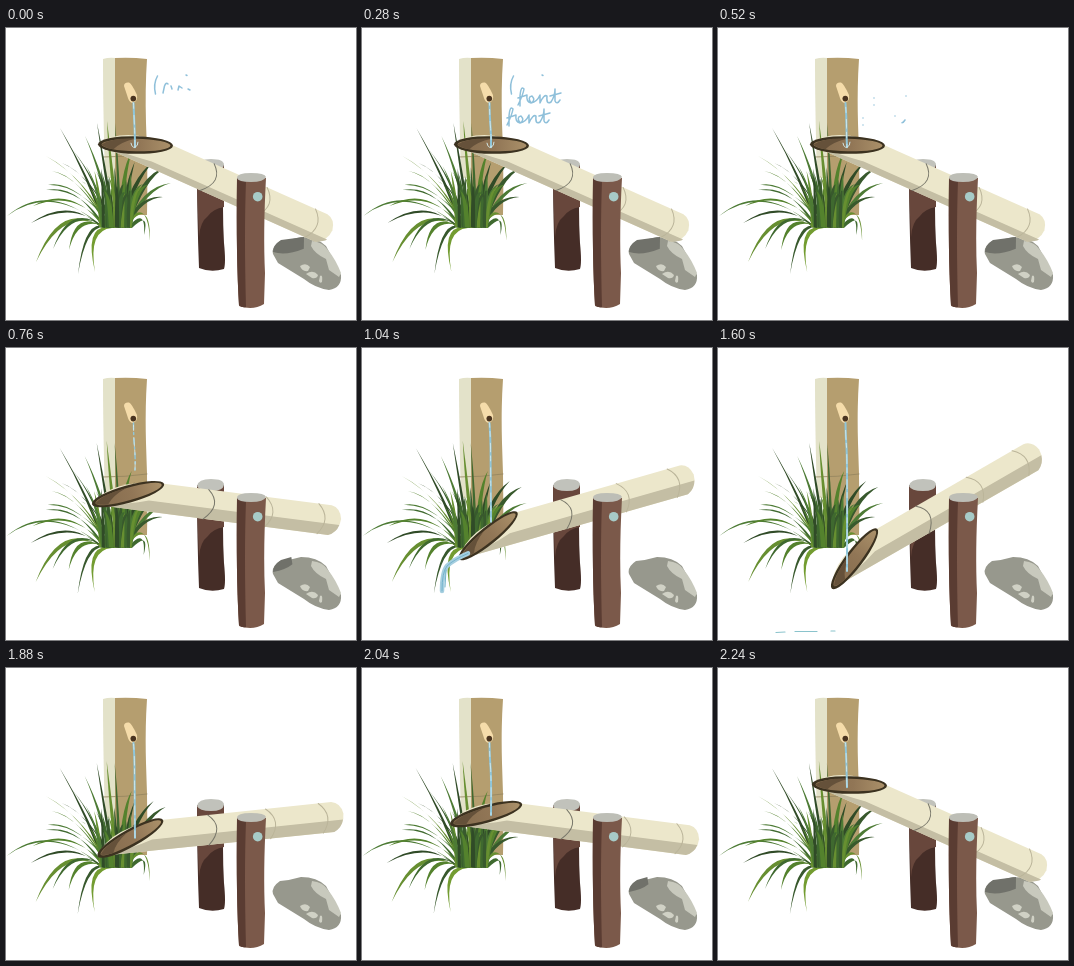
Write an HTML page that moves like this. It is 350 px wide and 292 px high and loops after 2280 ms.

```html
<!DOCTYPE html>
<html lang="en">
<head>
<meta charset="utf-8">
<title>Bamboo water fountain</title>
<style>
  html, body { margin: 0; width: 100%; height: 100%; overflow: hidden; background: #fff; }
  svg { display: block; width: 100vw; height: 100vh; }
  .line { fill: none; stroke-linecap: round; stroke-linejoin: round; }
</style>
</head>
<body>
<svg viewBox="0 0 350 292">
  <defs>
    <linearGradient id="hollow">
      <stop offset="0" stop-color="#846b4d"/>
      <stop offset=".55" stop-color="#917656"/>
      <stop offset="1" stop-color="#aa9069"/>
    </linearGradient>
  </defs>

  <g id="bamboo">
    <path fill="#e3e2c9" d="M97 31Q103 29 110 30V150H99Q97 80 97 31Z"/>
    <path fill="#b59e6f" d="M109 30Q125 29 141 31Q139 60 140 95Q142 140 141 187H109Z"/>
    <path class="line" stroke="#94855f" stroke-width=".8" d="M97 129Q120 129 141 126"/>
  </g>
  <g id="spout">
    <path fill="#f5dcaa" d="M118 58Q118 54 123 54.5Q126 56 131 67Q132 73 127 75Q123 75 121 67Z"/>
    <ellipse cx="127.3" cy="70.6" rx="2.8" ry="2.9" fill="#4a3420"/>
  </g>
  <g id="grass"></g>

  <g id="rock">
    <path fill="#97988d" d="M267 226Q265 219 274 213Q285 212 295 209Q311 209 320 218Q327 231 335 247Q336 260 323 262Q309 260 298 251L272 235Z"/>
    <path fill="#c8c9bd" d="M306 213Q317 214 322 222Q330 232 335 245L333 249L323 242L320 231Q309 226 305 218Z"/>
    <path fill="#d0d1c5" d="M294 238Q300 234 304 239L302 243Q296 244 294 238ZM300 246Q307 241 312 247Q311 251 306 250ZM314 248Q317 246 316 254Q314 256 313 253Z"/>
    <path id="shade" fill="#70716a"/>
  </g>

  <g id="backPost">
    <path fill="#452d27" d="M191 137H218Q216 180 218 215Q220 235 218 241Q205 245 193 240Q191 190 191 137Z"/>
    <path fill="#68473c" d="M191 138H218V179Q207 181 202 188Q194 194 193 209Q191 170 191 138Z"/>
    <path fill="#c1c2bb" d="M191 138Q192 131 205 131Q218 131 218 137Q217 143 205 143Q193 143 191 138Z"/>
  </g>

  <g id="tube">
    <path fill="#ece7cb" d="M-138 17Q-123 -11 -69 -12.5L100 -12.5Q109 -11 111 0Q111 12 100 17.5Z"/>
    <path id="under" fill="#c4bea4"/>
    <path class="line" stroke="#78776a" stroke-width="1" d="M-24 -12.5Q-8 1 -26 17.5"/>
    <path class="line" stroke="#bbb59a" stroke-width="1" d="M34 -12.5Q50 1 36 17.5M87 -12.5Q102 1 89 17.5"/>
    <g transform="translate(-103.5 2.3) rotate(-23)">
      <ellipse rx="37.5" ry="8.8" fill="#3c3220"/>
      <ellipse cx=".5" rx="34.5" ry="6.3" fill="url(#hollow)"/>
      <path fill="#65513a" d="M-34 0Q-23 -7 0 -6.3Q-15 -3 -22 4.7Q-31 3 -34 0Z"/>
    </g>
  </g>

  <g id="frontPost">
    <path fill="#7b594a" d="M231 150H260Q257 205 259 245L258 276Q247 283 233 278Q230 230 231 150Z"/>
    <path fill="#5a3c32" d="M231 151L240 153Q238 205 240 279Q235 280 233 277Q230 230 231 151Z"/>
    <path fill="#bdbeb6" d="M231 150Q231 145 245 145Q259 145 260 149Q258 154 245 154Q232 154 231 150Z"/>
    <circle cx="251.7" cy="168.7" r="4.8" fill="#a7cbc7"/>
  </g>

  <g id="water" class="line" stroke="#8fc6da">
    <path id="stream" stroke-width="2"/>
    <path id="streamGlint" stroke="#d9eef2" stroke-width=".8"/>
    <path id="ripple" stroke="#d2e6e6" stroke-width="1"/>
    <path id="spill" stroke="#a6cfe0" stroke-width="4.5"/>
    <path id="spillEdge" stroke="#74b3cc" stroke-width="1"/>
    <path id="puddle" stroke="#8ac3cc" stroke-width="1.2"/>
  </g>
  <g id="sound" class="line" stroke="#8fc0da" stroke-width="1.5"></g>
</svg>

<script>
const LOOP = 2280, STEP = 40;
const el = id => document.getElementById(id);
const clamp = (v, lo = 0, hi = 1) => Math.min(hi, Math.max(lo, v));
const span = (t, from, to) => clamp((t - from) / (to - from));
const setPath = (id, d) => el(id).setAttribute('d', d);

function add(parent, attrs) {
  const node = document.createElementNS('http://www.w3.org/2000/svg', 'path');
  for (const key in attrs) node.setAttribute(key, attrs[key]);
  return el(parent).appendChild(node);
}

function keyed(keys, t) {
  const i = keys.findIndex(k => k[0] >= t);
  if (i < 0) return keys[keys.length - 1][1];
  if (i === 0) return keys[0][1];
  const [t0, a] = keys[i - 1], [t1, b] = keys[i];
  return a + (b - a) * span(t, t0, t1);
}

// Tube angle in degrees over time
const TILT = [[0, 24], [600, 24], [760, 7.3], [1040, -16], [1200, -30],
              [1600, -30], [1880, -6], [2240, 24]];
const PIVOT = { x: 225, y: 157 };

// Blades: root x, bend x, bend y, tip x, tip y
const BLADES = [
  [97, 45, 153, 1, 188], [96, 66, 170, 25, 195], [98, 56, 173, 30, 234],
  [100, 65, 175, 47, 221], [100, 70, 183, 63, 222], [102, 80, 190, 72, 246],
  [104, 80, 200, 89, 244], [100, 84, 152, 54, 100], [102, 80, 150, 40, 128],
  [98, 75, 158, 40, 162], [102, 74, 148, 46, 143], [104, 90, 150, 66, 121],
  [108, 95, 142, 79, 108], [108, 98, 135, 91, 95], [112, 105, 140, 101, 93],
  [114, 112, 140, 109, 95], [99, 68, 158, 27, 178], [120, 136, 148, 160, 139],
  [122, 137, 160, 165, 155], [116, 126, 152, 148, 133], [118, 143, 165, 144, 213],
  [124, 142, 180, 138, 207], [115, 116, 145, 126, 123], [118, 135, 168, 157, 169],
  [108, 70, 153, 42, 157], [110, 84, 146, 56, 135]
];
const GREENS = ['#4d7b35', '#304b27', '#678f31', '#3f692f', '#54822d', '#38592d'];

let seed = 7;
const random = () => (seed = (seed * 16807) % 2147483647) / 2147483647;
for (let i = 0; i < 30; i++) {
  const root = 95 + random() * 31, lean = (root - 111) * 1.1 + (random() - .5) * 26;
  BLADES.push([root, root + lean * .25, 160, root + lean, 132 + random() * 38]);
}
const blades = BLADES.map((shape, i) => ({
  shape, width: 1.5 + (i * 7 % 5) * .22,
  node: add('grass', { fill: i === 6 ? '#739c31' : GREENS[i % GREENS.length] })
}));

function drawGrass(t) {
  const sway = .4 * Math.sin(t / LOOP * Math.PI * 4);
  for (const { shape: [root, bx, by, tx, ty], width: w, node } of blades) {
    node.setAttribute('d', `M${root - w} 199Q${bx - w} ${by - w} ${tx + sway} ${ty}` +
      `Q${bx + w} ${by + w} ${root + w} 200Z`);
  }
}

// Handwritten sound marks, each with start and end of writing and of erasing
const word = (x, y) => `M${x} ${y + 17}Q${x + 5} ${y + 7} ${x + 6} ${y + 1}` +
  `Q${x + 3} ${y - 3} ${x + 2} ${y + 8}V${y + 18}M${x} ${y + 10}L${x + 9} ${y + 7}` +
  `Q${x + 8} ${y + 14} ${x + 13} ${y + 15}Q${x + 18} ${y + 12} ${x + 14} ${y + 8}` +
  `Q${x + 9} ${y + 9} ${x + 13} ${y + 15}Q${x + 19} ${y + 14} ${x + 22} ${y + 7}V${y + 15}` +
  `Q${x + 26} ${y + 6} ${x + 29} ${y + 8}Q${x + 28} ${y + 17} ${x + 33} ${y + 14}` +
  `Q${x + 37} ${y + 8} ${x + 37} ${y + 1}V${y + 13}Q${x + 39} ${y + 17} ${x + 42} ${y + 12}` +
  `M${x + 32} ${y + 8}L${x + 43} ${y + 5}`;
const marks = [
  ['M151.5 48Q147 56 149.5 66', -80, 0, 400, 520],
  ['M180 47L181 47.5', -40, 0, 440, 520],
  ['M157 65L158.5 58Q160 54 162 56M165 58L166 61M172 62L173 58L176 60M182 61L184 62', -80, 0, 40, 120],
  [word(156, 60), 20, 200, 400, 540],
  [word(145, 80), 120, 280, 440, 560]
].map(([d, start, end, fade, gone]) => {
  const node = add('sound', { d, pathLength: 100 });
  return { node, start, end, fade, gone };
});

function drawSound(t) {
  for (const { node, start, end, fade, gone } of marks) {
    const head = span(t, start, end) * 100, tail = span(t, fade, gone) * 100;
    node.style.display = head > tail ? '' : 'none';
    node.setAttribute('stroke-dasharray', `0 ${tail} ${head - tail} 200`);
  }
}

function drawTube(t, angle, shift) {
  el('tube').setAttribute('transform', `translate(${PIVOT.x + shift} ${PIVOT.y}) rotate(${angle})`);
  const edge = 6 + Math.max(0, angle - 8) * .3;
  setPath('under', `M-138 17Q-106 14 -82 ${edge}L110 ${edge}Q108 14 100 17.5Z`);
  const reach = span(angle, -5, 24) * 22;
  setPath('shade', reach ? `M267 224Q267 217 275 212L${276 + reach} 209` +
    `L${278 + reach * .9} ${213 + reach * .35}Q280 ${217 + reach * .5} 267 224Z` : '');
}

function drawWater(t, angle, shift) {
  const rad = angle * Math.PI / 180;
  const place = (x, y) => [PIVOT.x + shift + x * Math.cos(rad) - y * Math.sin(rad),
                           PIVOT.y + x * Math.sin(rad) + y * Math.cos(rad)];
  const [lx, ly] = place(-138, 17), [rx, ry] = place(-69, -12);
  const hit = ly + (129 - lx) / (rx - lx) * (ry - ly) + 2;
  const thin = t >= 680 && t < 920;
  const end = thin ? 122 : t >= 920 && t < 1120 ? hit - 14 : hit;
  const wave = Math.sin(t / 70) * .5;
  const flow = `M127.5 75Q${128 + wave} 88 128.5 99T129 ${end}`;
  setPath('stream', flow);
  setPath('streamGlint', flow);
  el('stream').setAttribute('stroke-width', thin ? 1.4 : 2);
  el('stream').setAttribute('stroke-dasharray', thin ? '6 3 2 4' : 'none');
  el('streamGlint').setAttribute('stroke-dasharray', '5 7 9 4');
  el('streamGlint').setAttribute('stroke-dashoffset', -t / 5);
  setPath('ripple', t < 600 ? `M125 ${hit - 4}Q126 ${hit + 1} 129 ${hit}T132 ${hit - 5}` : '');

  const front = Math.min(284, 243 + (t - 1040) * .39);
  const tail = 205 + Math.max(0, t - 1200) * .4;
  let spill = '';
  if (t >= 960 && tail < front) {
    spill = tail < 216 && t < 1220
      ? `M${lx + 9} ${ly - 6}Q${lx - 5} ${ly} 85 ${Math.min(218, front)}Q80 224 80 ${front}`
      : `M80 ${tail}Q82 ${(tail + front) / 2} 79 ${front}`;
  }
  setPath('spill', spill);
  setPath('spillEdge', spill && spill + `M84 ${Math.max(tail, 222)}L83 ${front - 4}`);

  const spread = span(t, 1140, 1480);
  setPath('puddle', t >= 1160 && t < 1760
    ? `M${76 - 18 * spread} 284.5l${9 * spread} -.5M${85 - 8 * spread} 283.5h${22 * spread}` +
      `M${90 + 23 * spread} 283h4` : '');
  el('puddle').setAttribute('opacity', 1 - span(t, 1600, 1760));
}

function draw(now) {
  const t = Math.floor((now % LOOP) / STEP) * STEP;
  const angle = keyed(TILT, t);
  const shift = 2 * span(t, 1680, 1880);
  drawGrass(t);
  drawTube(t, angle, shift);
  drawWater(t, angle, shift);
  drawSound(t);
}

const began = performance.now();
function tick() {
  draw(performance.now() - began);
  requestAnimationFrame(tick);
}
tick();
</script>
</body>
</html>
```
